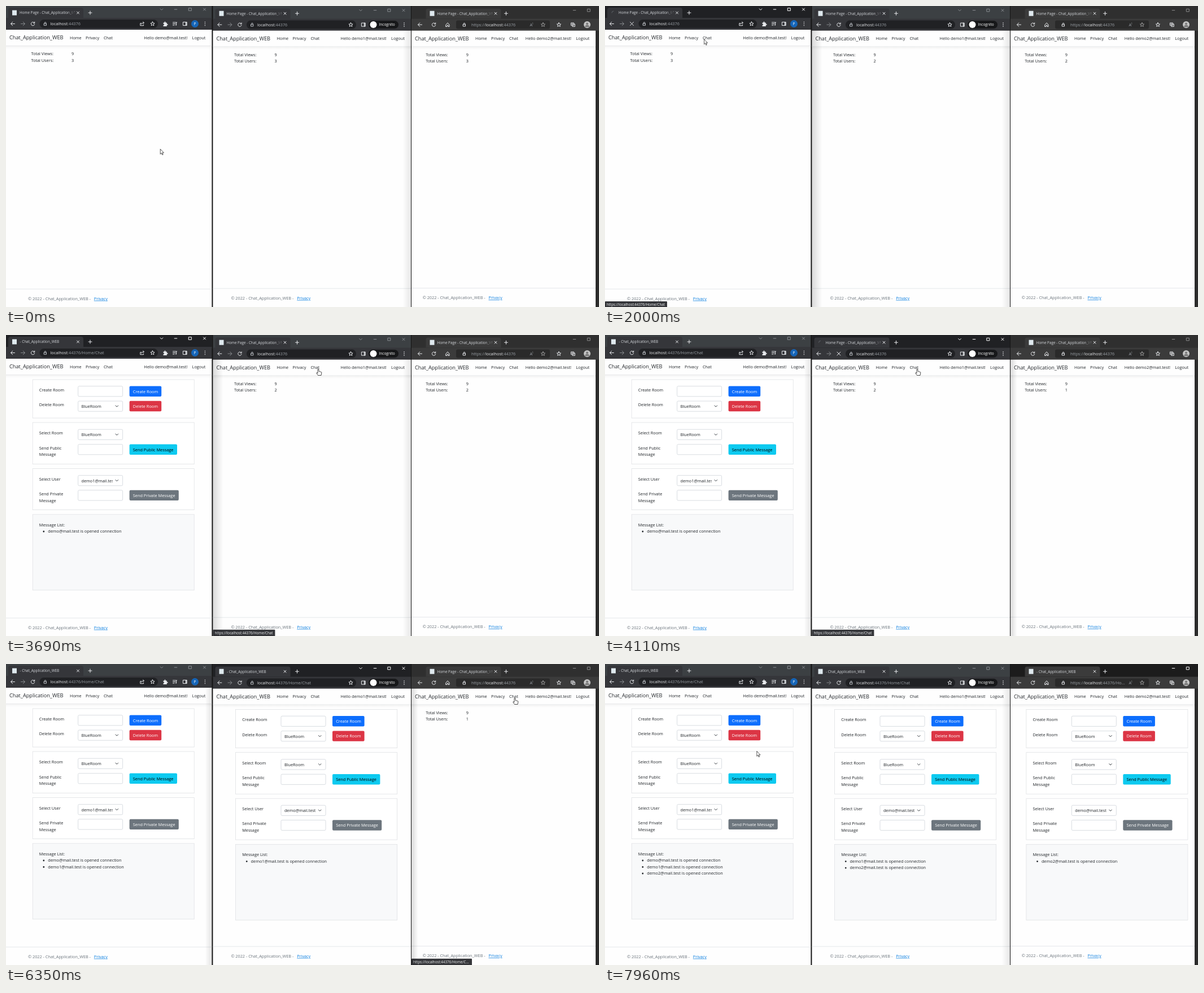
Write an HTML page that moves like this. It is 1050x533 px and loops after 8000 ms.

```html
<!DOCTYPE html>
<html lang="en">
<head>
<meta charset="utf-8">
<title>Chat application demo</title>
<style>
html, body { margin: 0; width: 100%; height: 100%; overflow: hidden; background: #111; }
body > svg { display: block; width: 100vw; height: 100vh; }
text { font: 7.3px "Open Sans", "Noto Sans", sans-serif; fill: #212529; white-space: pre; }
.brand { font-size: 9.2px; }
.tab { font-size: 6.35px; fill: #d3d6da; }
.url { fill: #9aa0a6; }
.url tspan { fill: #e8eaed; }
.status { font-size: 6.27px; fill: #f1f3f4; }
.pill { font-size: 6.5px; fill: #fff; }
.btn { font-size: 7.35px; fill: #fff; }
.dark { fill: #000; }
.foot { fill: #6c757d; }
.link { fill: #0b7fe0; text-decoration: underline; }
.card { fill: #fff; stroke: #dfe1e4; stroke-width: .8; }
.list { fill: #f8f9fa; }
.field { fill: #fff; stroke: #ced4da; stroke-width: .8; }
.icon { fill: none; stroke-width: 1; stroke-linecap: round; stroke-linejoin: round; }
</style>
</head>
<body>
<script>
const LOOP = 8000;
const css = [];
const pct = t => (t / LOOP * 100).toFixed(3) + '%';

// Group visible from a to b, then optionally fading out
function during(a, b, content, fade = 0) {
  const name = 'v' + css.length;
  css.push(`@keyframes ${name}{0%{opacity:${a ? 0 : 1}}${pct(a)}{opacity:1}` +
    `${pct(b)}{opacity:1;animation-timing-function:linear}${pct(b + fade)}{opacity:0}100%{opacity:0}}`);
  return `<g style="animation:${name} ${LOOP}ms step-end infinite">${content}</g>`;
}

const DROP = { brand: 3.2, tab: 2.3, status: 2.2, pill: 2.3 };
const text = (x, y, s, cls = '') =>
  `<text x="${x}" y="${y + (DROP[cls] || 2.7)}" class="${cls}">${s}</text>`;
const rect = (x, y, w, h, attrs) =>
  `<rect x="${x}" y="${y}" width="${w}" height="${h}" ${attrs}/>`;
const fill = (x, y, w, h, c, r = 0) => rect(x, y, w, h, `fill="${c}" rx="${r}"`);
const circle = (x, y, r, c) => `<circle cx="${x}" cy="${y}" r="${r}" fill="${c}"/>`;
const icon = (x, y, d, c = '#e8eaed') =>
  `<path class="icon" transform="translate(${x} ${y})" d="${d}" stroke="${c}"/>`;

const ICON = {
  back: 'M3.5 0H-3.5M-.3-3.3L-3.5 0L-.3 3.3',
  next: 'M-3.5 0H3.5M.3-3.3L3.5 0L.3 3.3',
  reload: 'M2.8-1.6A3.2 3.2 0 1 0 3.2 .8M3.2-3.4V-1.2H1',
  cross: 'M-2-2L2 2M2-2L-2 2',
  stop: 'M-3-3L3 3M3-3L-3 3',
  plus: 'M-3 0H3M0-3V3',
  down: 'M-2.3-1.1L0 1.2L2.3-1.1',
  min: 'M-2.3 0H2.3',
  max: 'M-2.3-2.3H2.3V2.3H-2.3Z',
  lock: 'M-2-.5H2V2.8H-2ZM-1.3-.5V-1.6A1.3 1.3 0 0 1 1.3-1.6V-.5',
  star: 'M0-3.6L1.1-1.2L3.6-1L1.7 .7L2.3 3.2L0 1.9L-2.3 3.2L-1.7 .7L-3.6-1L-1.1-1.2Z',
  share: 'M-1.5-1H-3.2V3.2H2.6V1.6M-1.2 1C-1-1 .6-1.8 3.2-1.8M1.6-3.5L3.4-1.8L1.6-.1',
  list: 'M-3.5-2.5H2M-3.5 0H1M-3.5 2.5H-.8M3.6-2.5H2.6V2.2M2.4 2.4H1.4',
  panel: 'M-3.2-3H3.2V3H-3.2ZM1.3-3V3M2.2-3V3',
  home: 'M-3 0L0-3.3L3 0V3.4H1V1H-1V3.4H-3Z',
  tabs: 'M-3.2-3.2H3.2V3.2H-3.2ZM-3.2-1.4H3.2',
  copies: 'M-3.2-3.2H1.4V1.2H-3.2ZM-1.2 1.2V3.3H3.3V-1.2H1.4M-.9-2.2V.2M-2.1-1H.3',
  spin: 'M0-3A3 3 0 0 0-3 0'
};
const dots = (x, y) => [-3, 0, 3].map(d => circle(x, y + d, .8, '#e8eaed')).join('');

const controls = (w, c) => w.controls.map(([k, x]) => icon(x, 6 + w.dy, ICON[k], c)).join('');

function tabStrip(w) {
  const { L, R, dy, tab, load, click } = w;
  const end = w.edge ? 1050 : R;
  const y = 12 + dy * .75;
  const strip = (bg, fg) => fill(L, 0, end - L, 24, bg) + controls(w, fg);
  const base = 21 + dy;
  return strip(...(w.edge ? ['#2f2f2f', '#8c8c8c'] : ['#3c4043', '#888c90'])) +
    during(click, w.blur, strip(w.edge ? '#1c1c1c' : '#202124', '#fff')) +
    `<path d="M${tab} ${base}V${base - 14}q0-4 4-4h125q4 0 4 4V${base}z" fill="${w.bar}"/>` +
    during(0, click, fill(tab + 7, y - 4.5, 8, 9, '#dfe9ee')) +
    during(click, load, icon(tab + 11, y, ICON.spin, '#5f6368')) +
    during(load, LOOP, fill(tab + 7, y - 4.5, 8, 9, '#dfe9ee')) +
    during(0, load, text(tab + 20, y, 'Home Page - Chat_Application_W', 'tab') +
      fill(tab + 105, y - 5, 12, 10, `url(#${w.edge ? 'fadeE' : 'fadeC'})`)) +
    during(load, LOOP, text(tab + 20.5, y, '- Chat_Application_WEB', 'tab')) +
    icon(tab + 123.5, y, ICON.cross) + icon(tab + (w.edge ? 142 : 145), y, ICON.plus);
}

function toolbar(w) {
  const { L, R, dy, load, click } = w;
  const y = 31.5 + dy, end = w.edge ? 1050 : R, rx = L + (w.edge ? 39.5 : 47.5);
  const reload = during(0, click, icon(rx, y, ICON.reload)) +
    during(click, load, icon(rx, y, ICON.stop)) +
    during(load, LOOP, icon(rx, y, ICON.reload));
  let s = fill(L, 21 + dy, end - L, 21.2, w.bar) + reload;
  if (w.edge) {
    const url = rest => text(824, y, `https://<tspan>localhost</tspan>:44376${rest}`, 'url');
    return s + fill(797, 25.5, 166, 15, '#2a2a2a', 3) +
      icon(733, y, ICON.back) + icon(782, y, ICON.home) + icon(811.5, y, ICON.lock) +
      during(0, load, url('')) + during(load, LOOP, url('/Ho...')) +
      text(927.5, y, 'A⁾', 'url') + icon(951, y, ICON.star, '#9a9a9a') +
      icon(979, y, ICON.star) + icon(1004, y, ICON.copies) +
      circle(1029, y, 6, '#c4c4c4') + circle(1029, y - 1.6, 2, '#777') +
      `<path d="M1025 ${y + 4.2}q0-3.6 4-3.6t4 3.6z" fill="#777"/>`;
  }
  const url = rest => text(L + 78.5, y, `<tspan>localhost</tspan>:44376${rest}`, 'url');
  s += fill(L + 59.5, y - 7.5, w.omni - L - 59.5, 15, '#202124', 7.5) +
    icon(L + 12, y, ICON.back) + icon(L + 30, y, ICON.next, '#85888c') +
    icon(L + 69.5, y, ICON.lock, '#bdc1c6') +
    during(0, load, url('')) + during(load, LOOP, url('/Home/Chat')) +
    icon(w.omni - 9.5, y, ICON.star) + dots(R - 12, y);
  if (w.guest) return s + icon(633, y, ICON.panel) + fill(642, y - 7, 53, 14, '#17181a', 7) +
    circle(650.5, y, 6, '#fff') + text(660.5, y, 'Incognito', 'pill');
  return s + icon(241, y, ICON.share) +
    `<path d="M278.500 29.500h2q-.3-2 1-2t1 2h2.300v2.300q2-.3 2 1t-2 1v2.200h-6.300v-2q1.700-.4 1.700-1.300t-1.700-1.200z" fill="#e8eaed"/>` +
    icon(299, y, ICON.list) + icon(317, y, ICON.panel) +
    circle(334.5, y, 6.5, '#1565b8') + text(332.4, y, 'P', 'pill');
}

function navBar(w) {
  const { L, R, dy } = w, y = 56 + dy;
  return fill(L, 42 + dy, R - L, 491 - dy, '#fefefe') +
    fill(L, 70 + dy, R - L, 6, 'url(#under)') + fill(L, 70 + dy, R - L, .7, '#e4e6e8') +
    text(L + 6, y, 'Chat_Application_WEB', 'brand') +
    text(L + 113, y, 'Home') + text(L + 141, y, 'Privacy') + text(L + 173, y, 'Chat') +
    text(w.hello, y, `Hello ${w.user}!`) + text(w.hello + 85.8 + w.gap, y, 'Logout');
}

function footer(w) {
  const { L, R, C, fy } = w;
  return fill(L, 500.7 + fy, R - L, .8, '#dee2e6') +
    text(39 + C, 518 + fy, '© 2022 - Chat_Application_WEB -', 'foot') +
    text(155.8 + C, 518 + fy, 'Privacy', 'link');
}

function homePage(w) {
  const x = 44.5 + w.C, d = w.dy;
  return text(x, 84.5 + d, 'Total Views:') + text(x + 71.5, 84.5 + d, '9') +
    text(x, 96 + d, 'Total Users:') +
    w.users.map(([a, b, n]) => during(a, b, text(x + 71.5, 96 + d, n))).join('');
}

function chatPage(w) {
  const card = (y, h, cls = '') => rect(47.2, y, 286, h, `class="card ${cls}"`);
  const field = y => rect(127.6, y, 79, 18.2, 'class="field" rx="2"');
  const select = (y, s) => field(y) +
    `<svg x="133" y="${y}" width="56" height="18">${text(.5, 9.4, s)}</svg>` +
    icon(196.3, y + 9, ICON.down, '#343a40');
  const button = (y, wd, c, s, cls = '') =>
    fill(218.6, y, wd, 18.4, c, 2) + text(224.8, y + 9.4, s, 'btn ' + cls);
  const label = (y, ...rows) => rows.map((s, i) => text(58.8, y + i * 11.6, s)).join('');
  const items = w.msgs.map(([t, who], i) => {
    const y = 347.7 + i * 11.5;
    return during(t, LOOP, circle(66.8, y + .3, 1.4, '#212529') +
      text(74.2, y, who + ' is opened connection'));
  }).join('');
  return `<g transform="translate(${w.C} ${w.dy})">` +
    card(79, 68) + label(97, 'Create Room') + field(90.6) + button(90.5, 56.6, '#0d6efd', 'Create Room') +
    label(123.4, 'Delete Room') + select(117, 'BlueRoom') + button(116.8, 56.6, '#dc3545', 'Delete Room') +
    card(155, 73.6) + label(173.5, 'Select Room') + select(167.2, 'BlueRoom') +
    label(200, 'Send Public', 'Message') + field(193.6) +
    button(193.5, 84.4, '#0dcaf0', 'Send Public Message', 'dark') +
    card(236.6, 73) + label(255, 'Select User') + select(248.6, w.peer) +
    label(281.2, 'Send Private', 'Message') + field(274.8) +
    button(274.7, 87.2, '#6c757d', 'Send Private Message') +
    card(317.8, 134, 'list') + label(336, 'Message List:') + items + '</g>';
}

function status(w) {
  const [a, b, wd, s] = w.status, y = w.dy ? 521.8 : 523;
  return during(a, b, fill(w.L, y, wd, 12, '#35363a', 1) +
    text(w.L + 3, y + 5.8, 'https://localhost:44376/Home/' + s, 'status'), 150);
}

const shade = (x, wd, dir, a, b) =>
  during(a, b, fill(x, 42, wd, 491, `url(#${dir})`));

const drawWindow = w => tabStrip(w) + toolbar(w) + navBar(w) +
  during(0, w.load, homePage(w)) + during(w.load, LOOP, chatPage(w)) + footer(w) + status(w);

const [A, B, C] = ['demo@mail.test', 'demo1@mail.test', 'demo2@mail.test'];
const windows = [
  { L: 0, R: 364.4, C: 0, dy: 0, fy: 0, tab: 4, omni: 269, bar: '#35363a', user: A, peer: B,
    hello: 244.3, gap: -.5, click: 1930, load: 2480, blur: 3750, users: [[0, LOOP, 3]],
    msgs: [[2550, A], [4290, B], [7060, C]], status: [1930, 2850, 110, 'Chat'],
    controls: [['down', 275.5], ['min', 300.5], ['max', 326], ['cross', 351.5]] },
  { L: 366.4, R: 717, C: 359.4, dy: 1.6, fy: -1, tab: 370.5, omni: 620, bar: '#35363a', guest: true,
    user: B, peer: A, hello: 592.6, gap: 3.7, click: 3750, load: 4230, blur: 6620,
    users: [[0, 1930, 3], [1930, LOOP, 2]],
    msgs: [[4290, B], [7060, C]], status: [3430, 4370, 110, 'Chat'],
    controls: [['down', 628], ['min', 653.5], ['max', 678.5], ['cross', 704]] },
  { L: 718, R: 1044, C: 698.7, dy: 1.6, fy: -1.4, tab: 743.5, bar: '#3b3b3b', edge: true,
    user: C, peer: A, hello: 919.8, gap: 3.7, click: 6620, load: 7000, blur: LOOP,
    users: [[0, 1930, 3], [1930, 3820, 2], [3820, LOOP, 1]],
    msgs: [[7060, C]], status: [6290, 7150, 107, 'C...'],
    controls: [['min', 1006.5], ['max', 1032]] }
];

// Pointer path: time, x, y
const path = [
  [0, 272.7, 253], [70, 272.7, 253], [230, 252, 86], [600, 40, 26], [720, 12, 50], [1020, 98, 85],
  [1400, 147, 83], [1560, 157, 70], [1860, 175, 58.5], [2150, 175, 58.5], [2680, 390, 95],
  [2940, 480.5, 87.5], [3430, 553, 60], [4370, 553, 60], [4700, 600, 110], [5040, 648.5, 138],
  [5110, 699, 113], [5400, 800, 95], [5800, 942, 70], [6060, 920, 63], [6250, 901, 60],
  [6620, 901, 60], [7000, 860, 250], [7340, 711, 452], [7600, 450, 300], [7850, 193, 141],
  [7960, 268.3, 154], [8000, 268.3, 154]
];
css.push('@keyframes pointer{' + path.map(([t, x, y]) =>
  `${pct(t)}{transform:translate(${x}px,${y}px)}`).join('') + '}');

const shape = d => `<path d="${d}" fill="#fff" stroke="#222" stroke-width=".8" stroke-linejoin="round"/>`;
const arrow = shape('M.4 .3V9.300L2.500 7.400L4 10.700L5.300 10.100L3.900 6.900H6.700Z');
const hand = shape('M-1 1Q0-.5 1 1V4.500L5 5.400Q6 5.700 5.800 7L5 11.500H-.5L-3 8Q-3.500 6.500-2.300 6.500L-1 7.800Z');
const hovers = [[1800, 1930], [3400, 4230], [6200, 6750]];
const starts = [230, ...hovers.map(h => h[1])];
const ends = [...hovers.map(h => h[0]), LOOP];
const pointer = `<g style="animation:pointer ${LOOP}ms linear infinite">` +
  during(0, 70, arrow) + starts.map((a, i) => during(a, ends[i], arrow)).join('') +
  hovers.map(([a, b]) => during(a, b, hand)).join('') + '</g>';

const gradient = (id, dir, c, from, to) => `<linearGradient id="${id}" ${dir}>` +
  `<stop stop-color="${c}" stop-opacity="${from}"/><stop offset="1" stop-color="${c}" stop-opacity="${to}"/></linearGradient>`;
const defs = '<defs>' + gradient('fadeC', '', '#35363a', 0, 1) + gradient('fadeE', '', '#3b3b3b', 0, 1) +
  gradient('under', 'x2="0" y2="1"', '#000', .05, 0) +
  gradient('fromLeft', '', '#000', .14, 0) + gradient('fromRight', '', '#000', 0, .1) + '</defs>';

const scene = defs + fill(0, 0, 1050, 533, '#141414') + fill(1044, 42, 6, 491, '#2b2b2b') +
  windows.map(drawWindow).join('') +
  shade(366.4, 18, 'fromLeft', 1860, 3750) +
  shade(703, 14, 'fromRight', 0, 3750) + shade(703, 14, 'fromRight', 6620, LOOP) +
  shade(352.4, 12, 'fromRight', 3750, 6620) + shade(718, 12, 'fromLeft', 3750, 6620) +
  pointer;

document.body.innerHTML = `<style>${css.join('\n')}</style>` +
  `<svg viewBox="0 0 1050 533" preserveAspectRatio="none">${scene}</svg>`;
</script>
</body>
</html>
```
